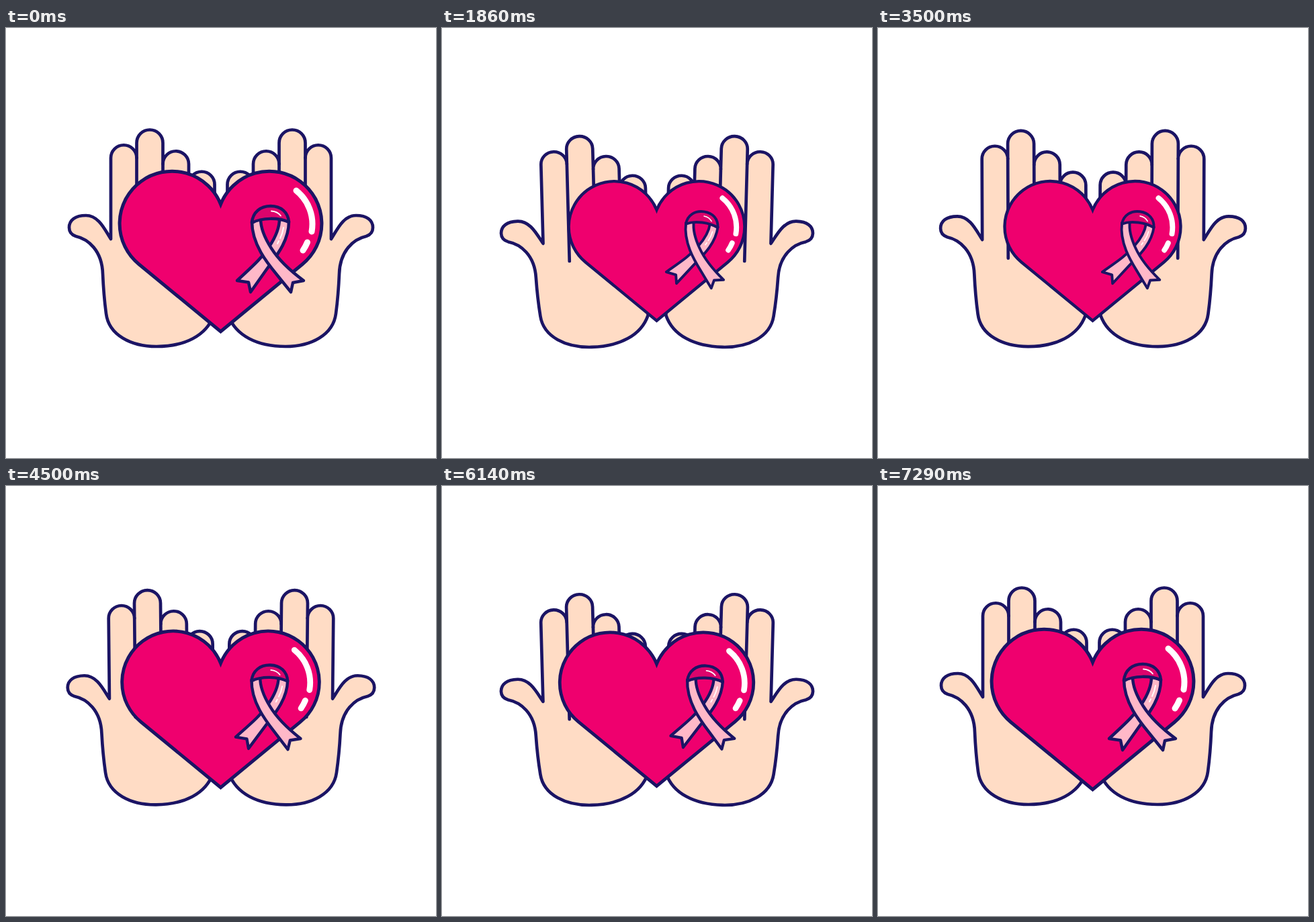
An HTML page that plays this animation: 640x640 px, repeating every 7370 ms.

```html
<!DOCTYPE html>
<html lang="en">
<head>
<meta charset="utf-8">
<title>Caring hands</title>
<style>
  html, body { margin: 0; width: 100%; height: 100%; overflow: hidden; background: #fff; }
  svg { display: block; width: 100vw; height: 100vh; }
  .line { stroke: #1b1464; stroke-width: 4.7; stroke-linecap: round; stroke-linejoin: round; }
  .skin { fill: #ffdcc5; }
  .heart { fill: #ef006e; stroke-width: 5; stroke-linejoin: miter; }
  .strap { fill: #ffb8c8; stroke-width: 4.5; }
  .cap { fill: #dc046c; stroke-width: 4.5; }
  .shine { fill: none; stroke: #fff; stroke-width: 9; stroke-linecap: round; }
  .thin { stroke-width: 1.8; }
</style>
</head>
<body>
<svg viewBox="0 0 640 640">
  <defs>
    <g id="hand" class="line skin">
      <path d="M156 314 V193.5 A19.25 19.25 0 0 1 194.5 193.5 V171 A19.5 19.5 0 0 1 233.5 171
        V202.5 A19.25 19.25 0 0 1 272 202.5 V233 A19.25 19.25 0 0 1 310.5 233 V400 L309 428
        C298 458 266 474 224 474 C186 474 153 457 149 425 C147 410 145 390 144 366
        C143 331 122 314 104 310 C98 308 94 304 94 297 C94 286 103 279 119 279
        C138 279 147 300 156 314 Z"/>
      <path fill="none" d="M194.5 193 V342 M233.5 202 V300 M272 233 V300"/>
    </g>
  </defs>

  <g class="palm"><use href="#hand"/></g>
  <g transform="translate(640 0) scale(-1 1)"><g class="palm"><use href="#hand"/></g></g>

  <g id="heart">
    <path class="line heart" d="M319.5 262.2 A78 78 0 1 0 198 351.8 L319.5 451.7 L441 351.8 A78 78 0 1 0 319.5 262.2 Z"/>
    <path class="shine" d="M432 242 A64 64 0 0 1 455 303 M448.5 319 A64 64 0 0 1 442 331"/>
    <g id="ribbon">
      <path class="line strap" d="M421 288 C421 318 401 341 388 359 L364 393 L361 378.5 L344 376
        C363 358 380 344 392 325 C402 310 407 298 407 284 Z"/>
      <path class="shine thin" d="M413 297 C412 304 410 309 408 313 M406 317 L404 321"/>
      <path class="line strap" d="M366 288 C366 322 389 350 403 367 L424 393 L427 379 L443 376
        C424 362 407 347 395 328 C384 311 379 298 379 284 Z"/>
      <path class="line cap" d="M366 290 C367 274 379 265 394 265 C409 265 420 274 421 289 C406 282 381 282 366 290 Z"/>
      <path class="shine thin" d="M395 272.5 Q404 273 409 279.5"/>
    </g>
  </g>
</svg>
<script>
  const LOOP = 7370, START = 570, STEP = 71.49;

  // [time, amount] pairs, eased like a sine between neighbours
  const LEAN = [[570, 0], [2139, 1], [3937, 0], [5340, 1], [5840, 1], [7290, 0]];
  const BEAT = [[570, 0], [1530, 1], [1880, 1], [2790, 0], [3540, 1], [4290, 0],
                [5040, 1], [5790, 0], [6540, 1], [7290, 0]];

  const palms = document.querySelectorAll('.palm');
  const heart = document.getElementById('heart');
  const ribbon = document.getElementById('ribbon');

  function amount(keys, t) {
    const i = keys.findIndex(k => k[0] > t);
    if (i < 1) return 0;
    const [t0, a] = keys[i - 1], [t1, b] = keys[i];
    return a + (b - a) * (1 - Math.cos(Math.PI * (t - t0) / (t1 - t0))) / 2;
  }

  function draw(now) {
    const t = now % LOOP;
    // the motion advances at about 14 poses a second
    const pose = START + Math.floor((t - START + 5) / STEP) * STEP;
    const h = amount(LEAN, pose), u = amount(BEAT, pose);
    const s = 1 - 0.13 * u;

    const lean = [1, -0.027 * h, 0.0285 * h, 1 - 0.0285 * h, -14.9 * h, 20.5 * h];
    palms.forEach(p => p.setAttribute('transform', `matrix(${lean})`));
    heart.setAttribute('transform', `translate(319.5 328) scale(${s}) translate(-319.5 -328)`);
    ribbon.setAttribute('transform', `rotate(${7.8 * u} 396 313)`);
    requestAnimationFrame(draw);
  }

  draw(performance.now());
</script>
</body>
</html>
```
